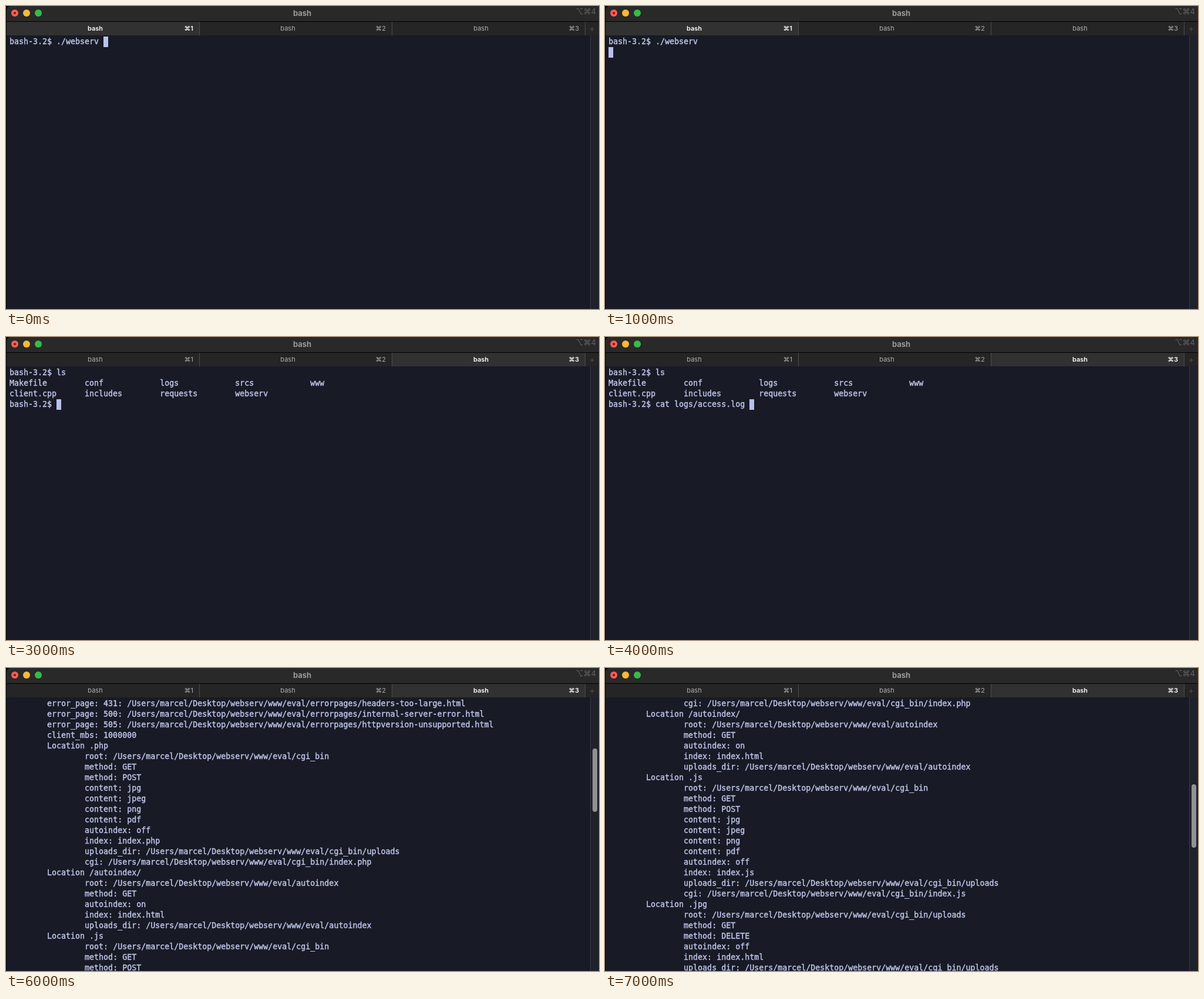
An HTML page for the animation above (8000 ms loop, 1010 by 516 pixels).

```html
<!DOCTYPE html>
<html lang="en">
<head>
<meta charset="utf-8">
<title>Terminal</title>
<style>
html, body { margin: 0; width: 100%; height: 100%; overflow: hidden; background: #000; }
#win { position: absolute; left: 1px; top: 0; width: 1009px; height: 516px; overflow: hidden;
  background: #181a25; border-top-left-radius: 7px; font: 11px/22px Inter, "DejaVu Sans", sans-serif; }
#win * { position: absolute; white-space: pre; }
#bar { left: 0; top: 0; width: 100%; height: 26px; background: #292929; border-bottom: 1px solid #000; }
#bar i { top: 6px; width: 12px; height: 12px; border-radius: 50%; }
#bar i b { left: 4px; top: 4px; width: 4px; height: 4px; border-radius: 50%; background: #7c110c; }
#title { left: 0; width: 1007px; top: 1px; text-align: center; font-size: 13px; font-weight: 700; color: #999; }
#key { right: 5px; top: -2px; font-size: 13px; color: #626262; }
#tabs { left: 0; top: 27px; width: 100%; height: 23px; background: #252525; }
.tab { top: 0; width: 328px; height: 23px; color: #b0b0b0; border-right: 1px solid #4c4c4c; }
.tab span { left: 0; width: 302px; text-align: center; }
.tab em { right: 10px; font-style: normal; }
.tab.on { background: #313131; color: #fff; font-weight: 600; }
#plus { left: 992px; top: 0; font-size: 16px; font-weight: 300; color: #555; }
#gutter { left: 994px; top: 50px; width: 14px; height: 466px; background: #1f212b; border-left: 1px solid #373943; }
#thumb { left: 998px; width: 8px; height: 108px; border-radius: 4px; background: #919194; }
#text { left: 5px; top: 52px; margin: 0; color: #bcc3e6; tab-size: 8;
  font: 13.3px/18px "DejaVu Sans Mono", monospace; -webkit-text-stroke: .45px #bcc3e6; }
#win #text u { position: static; display: inline-block; width: 8px; height: 18px; vertical-align: top; background: #b9c1ef; }
</style>
</head>
<body>
<div id="win">
  <div id="bar">
    <i style="left:8px;background:#fb5d55"><b></b></i>
    <i style="left:28px;background:#fab937"></i>
    <i style="left:48px;background:#36bb47"></i>
    <div id="title">bash</div>
    <div id="key">⌥⌘4</div>
  </div>
  <div id="tabs">
    <div class="tab" style="left:0"><span>bash</span><em>⌘1</em></div>
    <div class="tab" style="left:328px"><span>bash</span><em>⌘2</em></div>
    <div class="tab" style="left:657px"><span>bash</span><em>⌘3</em></div>
    <div id="plus">+</div>
  </div>
  <pre id="text"></pre>
  <div id="gutter"></div>
  <div id="thumb"></div>
</div>
<script>
const $ = id => document.getElementById(id);
const tabs = document.querySelectorAll('.tab');
const prompt = 'bash-3.2$ ', cursor = '<u></u>';
const root = '/Users/marcel/Desktop/webserv/www/eval', bin = root + '/cgi_bin';

const errors = ['404 not-found', '400 bad-request', '403 forbidden', '405 method-not-allowed',
  '413 payload-too-large', '415 media-unsupported', '431 headers-too-large',
  '500 internal-server-error', '505 httpversion-unsupported'].map(e => {
    const [code, page] = e.split(' ');
    return `\terror_page: ${code}: ${root}/errorpages/${page}.html`;
  });

const block = (name, ...lines) => ['\tLocation ' + name, ...lines.map(l => '\t\t' + l)];
const script = ext => block('.' + ext, 'root: ' + bin, 'method: GET', 'method: POST',
  'content: jpg', 'content: jpeg', 'content: png', 'content: pdf', 'autoindex: off',
  'index: index.' + ext, `uploads_dir: ${bin}/uploads`, `cgi: ${bin}/index.${ext}`);

const log = [
  prompt + 'cat logs/access.log', '2023-03-06 22:08:29 CONFIGURATION', '',
  'Nombre de server: 2', 'SERVER #1', '\tport: 80', '\tip: 0.0.0.0',
  '\tserver_name: example.com', '\tserver_name: localhost',
  '\troot: ' + root, '\tindex: index.html', ...errors, '\tclient_mbs: 1000000',
  ...script('php'),
  ...block('/autoindex/', `root: ${root}/autoindex`, 'method: GET', 'autoindex: on',
    'index: index.html', `uploads_dir: ${root}/autoindex`),
  ...script('js'),
  ...block('.jpg', `root: ${bin}/uploads`, 'method: GET', 'method: DELETE', 'autoindex: off',
    'index: index.html', `uploads_dir: ${bin}/uploads`)
];
const page = from => log.slice(from, from + 26).join('\n');

const listing = prompt + 'ls\n' + [['Makefile', 'conf', 'logs', 'srcs', 'www'],
  ['client.cpp', 'includes', 'requests', 'webserv']]
  .map(row => row.map(s => s.padEnd(16)).join('')).join('\n') + '\n' + prompt;

// Each step lasts one second: active tab, text, scroll thumb top
const steps = [
  [0, prompt + './webserv ' + cursor],
  [0, prompt + './webserv \n' + cursor],
  [2, prompt + 'ls' + cursor],
  [2, listing + cursor],
  [2, listing + 'cat logs/access.log ' + cursor],
  [2, page(0), 65],
  [2, page(17), 137],
  [2, page(32), 198]
];

let shown = -1, start;
function draw(now) {
  start ??= now;
  const n = Math.floor((now - start) / 1000) % steps.length;
  if (n !== shown) {
    const [active, text, thumb] = steps[shown = n];
    tabs.forEach((t, i) => t.classList.toggle('on', i === active));
    $('text').innerHTML = text;
    $('thumb').style.display = thumb ? 'block' : 'none';
    $('thumb').style.top = thumb + 'px';
  }
  requestAnimationFrame(draw);
}
requestAnimationFrame(draw);
</script>
</body>
</html>
```
